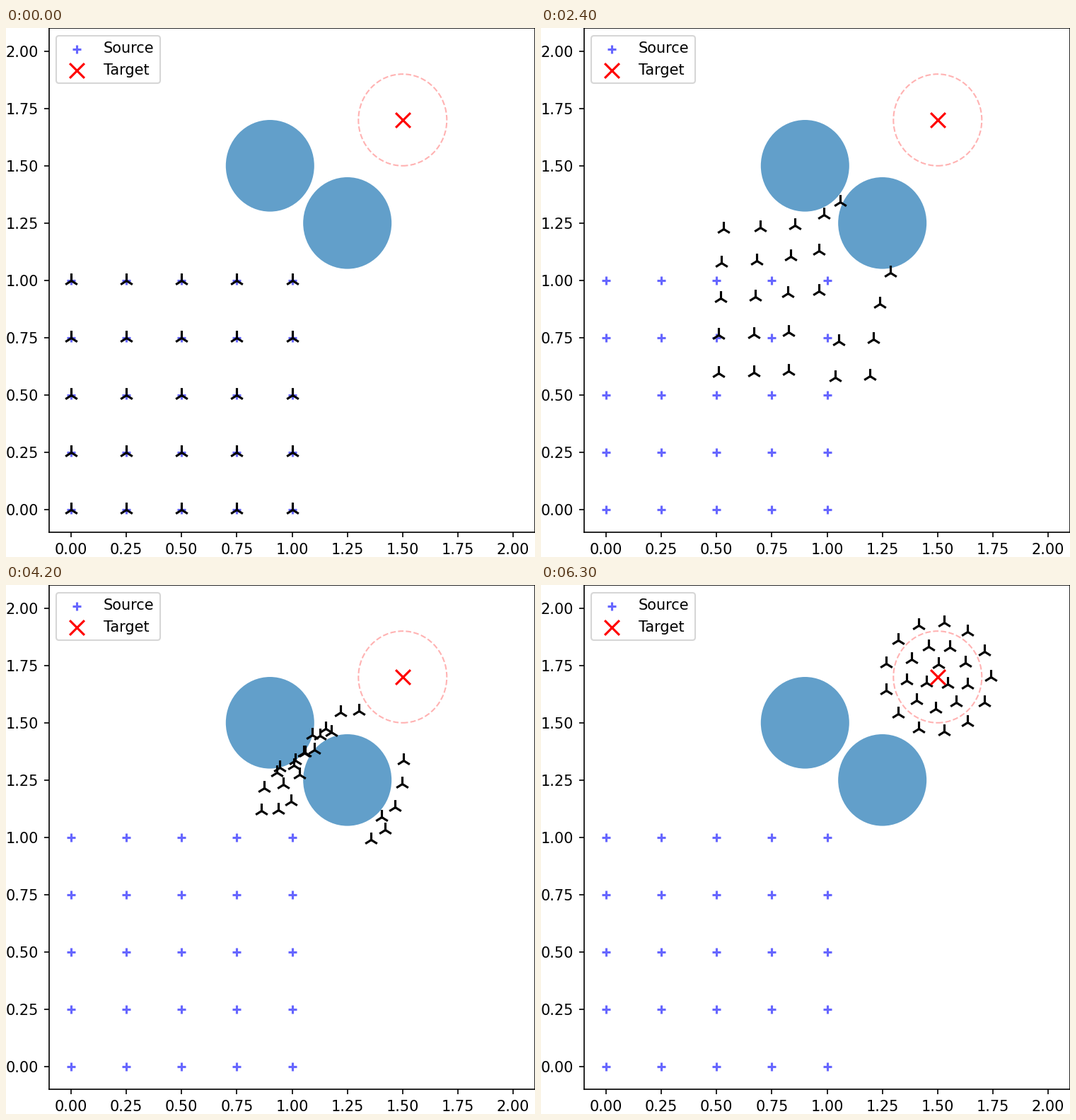
These frames come from a looping animation (748 px wide and 748 px high, 6600 ms). A matplotlib script:

```python
import numpy as np
import matplotlib.pyplot as plt
from matplotlib.animation import FuncAnimation
from matplotlib.patches import Circle

SIZE, DPI = 748, 150
STEPS = 20
TICKS = np.arange(0, 2.01, 0.25)
GOAL = np.array([1.5, 1.7])
UPPER, LOWER = np.array([0.9, 1.5]), np.array([1.25, 1.25])
RADIUS = 0.2
GAP = (UPPER + LOWER) / 2                 # way between the obstacles
BYPASS = LOWER + np.array([0.16, -0.08])  # way round the lower one
RINGS = [(3, 0.055, 87), (9, 0.14, 26.5), (13, 0.24, 0)]  # count, radius, phase
SHARPNESS = 6                             # how briefly a path bends to its way

grid = np.array([(x, y) for y in TICKS[:5] for x in TICKS[:5]])


def formation():
    """Final offsets from the goal: inner agents fill inner rings, by angle."""
    rel = grid - (0.49, 0.493)
    angle = np.degrees(np.arctan2(rel[:, 1], rel[:, 0]))
    order = np.argsort(np.hypot(*rel.T))
    slots = np.zeros_like(grid)
    for count, radius, phase in RINGS:
        ring, order = order[:count], order[count:]
        turn = (angle[ring] - phase + 180 / count) % 360
        ring = ring[np.argsort(turn)]
        a = np.radians(phase + 360 / count * np.arange(count))
        slots[ring] = radius * np.column_stack([np.cos(a), np.sin(a)])
    return slots


def detours():
    """For each straight path: where it is nearest its way, and the gap to it."""
    to_obstacle = LOWER - grid
    right = heading[:, 0] * to_obstacle[:, 1] > heading[:, 1] * to_obstacle[:, 0]
    way = np.where(right[:, None], BYPASS, GAP)
    near = ((way - grid) * heading).sum(1) / (heading**2).sum(1)
    near = near[:, None]
    return near, way - (grid + near * heading)


heading = GOAL - grid
slots = formation()
near, bend = detours()


def keep_clear(points):
    """Push points that fall inside an obstacle out to its rim."""
    for center in (UPPER, LOWER):
        offset = points - center
        dist = np.maximum(np.hypot(*offset.T), 1e-9)[:, None]
        points = center + offset * np.maximum(1, RADIUS / dist)
    return points


def agents_at(step):
    s = step / STEPS
    bump = ((s / near)**near * ((1 - s) / (1 - near))**(1 - near))**SHARPNESS
    return keep_clear(grid + s * heading + bump * bend + s**3 * slots)


fig = plt.figure(figsize=(SIZE / DPI, SIZE / DPI), dpi=DPI, facecolor="white")
ax = fig.add_axes([60.8 / SIZE, 34.8 / SIZE, 687.5 / SIZE, 712.8 / SIZE])
ax.set(xlim=(-0.1, 2.1), ylim=(-0.1, 2.1), xticks=TICKS, yticks=TICKS)

for center in (UPPER, LOWER):
    ax.add_patch(Circle(center, RADIUS, color="C0", alpha=0.7, lw=0))
ax.add_patch(Circle(GOAL, RADIUS, fill=False, ec="red", ls="--", alpha=0.3))

ax.scatter(*grid.T, marker="+", color="blue", alpha=0.6, label="Source")
ax.scatter(*GOAL, s=100, marker="x", color="red", zorder=3, label="Target")
agents = ax.scatter(*grid.T, s=100, marker="2", color="black", zorder=2)
ax.legend(loc="upper left")


def update(frame):
    agents.set_offsets(agents_at(max(frame - 1, 0)))
    return (agents,)


anim = FuncAnimation(fig, update, frames=STEPS + 2, interval=300,
                     repeat=True, repeat_delay=0)
plt.show()
```
